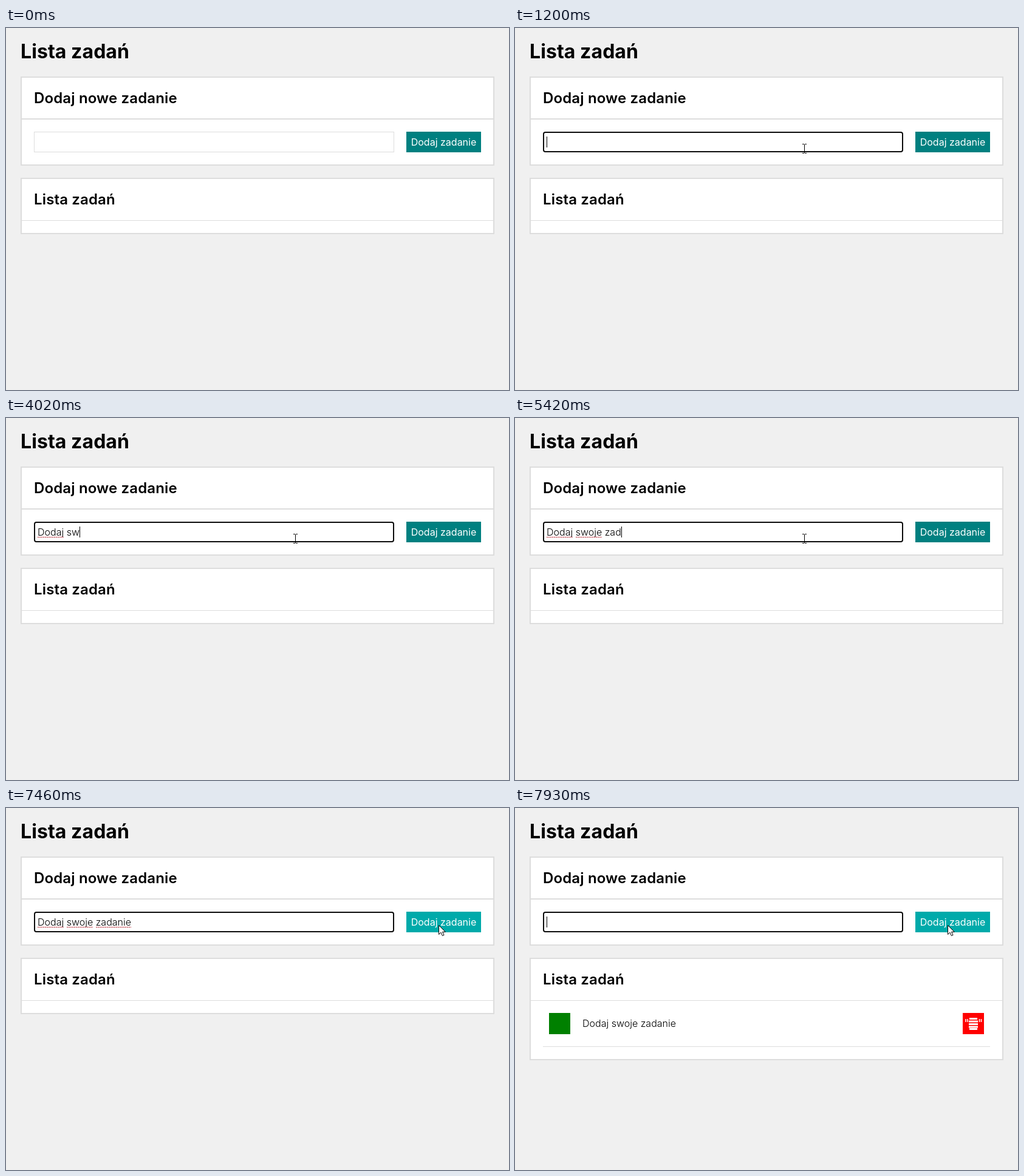
Write an HTML page that moves like this. It is 828 by 597 pixels and loops after 8 s.

```html
<!DOCTYPE html>
<html lang="pl">
<head>
<meta charset="utf-8">
<title>Lista zadań</title>
<style>
html, body { margin: 0; width: 100%; height: 100%; overflow: hidden; background: #f0f0f0; }
body { position: relative; color: #000; font: 400 16px/20px Inter, sans-serif; font-optical-sizing: none; }
body * { position: absolute; box-sizing: border-box; margin: 0; white-space: pre; }
h1 { left: 24px; top: 19px; font: 700 32px/39px Inter, sans-serif; letter-spacing: .002em; }
h2 { left: 20px; top: 19px; font: 600 24px/29px Inter, sans-serif; letter-spacing: .006em; }
.card { left: 24px; width: 780px; background: #fff; border: 2px solid #ddd; }
.rule { left: 0; width: 776px; background: #ddd; }
#add { top: 80px; height: 147px; }
#list { top: 247px; height: 93px; }
#list.filled { height: 169px; }
#field { left: 46px; top: 171px; width: 593px; height: 34px; background: #fff; border: 1px solid #ddd; }
#field.focus { border: 2px solid #0c0c0c; border-radius: 4px; }
#typed { left: 52px; top: 178px; font-weight: 300; }
#typed span, #caret { position: relative; }
#typed span.marked::after {
  content: ""; position: absolute; left: 0; right: 0; top: 18px; height: 1px;
  background: repeating-linear-gradient(90deg, #b3202c 0 2px, #f0d0d2 2px 3px);
}
#caret::after { content: ""; position: absolute; left: 0; top: 1px; width: 1px; height: 18px; background: #000; }
#button {
  left: 659px; top: 171px; width: 123px; height: 34px;
  line-height: 34px; text-align: center; color: #fff; background: #008080;
}
#button.hover { background: #00aaaa; }
#item { left: 20px; top: 89px; width: 736px; height: 56px; border-bottom: 1px solid #ddd; font-weight: 300; }
#item b { top: 0; width: 35px; height: 35px; }
#done { left: 10px; background: #008000; }
#remove { left: 691px; background: #f00; }
#item p { left: 65px; top: 7px; }
svg { left: 0; top: 0; overflow: visible; }
</style>
</head>
<body>
<h1>Lista zadań</h1>
<div class="card" id="add">
  <h2>Dodaj nowe zadanie</h2>
  <div class="rule" style="top:67px;height:2px"></div>
</div>
<div id="field"></div>
<div id="typed"><span></span><span></span><span></span><span></span><span></span><i id="caret"></i></div>
<div id="button">Dodaj zadanie</div>
<div class="card" id="list">
  <h2>Lista zadań</h2>
  <div class="rule" style="top:68px;height:1px"></div>
  <div id="item">
    <b id="done"></b>
    <p>Dodaj swoje zadanie</p>
    <b id="remove"><svg width="35" height="35" fill="none" stroke="#fff">
      <path d="M11 9.5h13M10 14h15M10 18.5h15M10 23h15M11 26.5h13" stroke-width="3"/>
      <path d="M5 10v5M8 10v5M27.5 10v5M30.5 10v5" stroke-width="1.5"/>
    </svg></b>
  </div>
</div>
<svg id="cursor" width="1" height="1">
  <path id="arrow" d="M.5 .5V15.5L4 12.2 6.4 17.7 9 16.6 6.6 11.3H11.3Z" fill="#fff" stroke="#000"/>
  <path id="beam" d="M-3 -7.5H0M1 -7.5H4M-3 7.5H0M1 7.5H4M.5 -7V7" fill="none" stroke="#000"/>
</svg>
<script>
const LOOP = 8000, STEP = 1000 / 15, BLINK = 525;
const ENTER = 330, FOCUS = 990, TYPE = 2330, TYPED = 5880;
const LEAVE = 6540, LAST_MARK = 6940, PRESS = 7810, ADDED = 7930;
const TEXT = "Dodaj swoje zadanie";

// typing rhythm: time, characters typed; linear in between
const RHYTHM = [[TYPE, 1], [2870, 4], [3370, 5], [4550, 12], [5480, 16], [TYPED, TEXT.length]];

// pointer paths: start, bend, end of a quadratic curve
const ARRIVE = { at: ENTER, steps: 8, power: 1, points: [[812, 299], [500, 240], [476, 199]] };
const DEPART = { at: LEAVE, steps: 10, power: 1.5, points: [[476, 199], [600, 218], [712, 193]] };

const $ = id => document.getElementById(id);
const show = (el, on) => { el.style.display = on ? "" : "none"; };
const inside = ([x, y], left, right, top, bottom) => x >= left && x < right && y >= top && y < bottom;
const spans = [...document.querySelectorAll("#typed span")];
const segments = TEXT.split(/( )/);

function typedCount(t) {
  if (t < TYPE || t >= ADDED) return 0;
  if (t >= TYPED) return TEXT.length;
  const i = RHYTHM.findIndex(key => key[0] > t);
  const [t0, n0] = RHYTHM[i - 1], [t1, n1] = RHYTHM[i];
  return Math.floor(n0 + (n1 - n0) * (t - t0) / (t1 - t0));
}

// the caret stays lit while typing and blinks after the last action
function caretOn(t) {
  if (t < FOCUS) return false;
  if (t >= ADDED || (t >= TYPE && t < TYPED)) return true;
  const idle = t - (t < TYPE ? FOCUS : TYPED);
  return idle % (2 * BLINK) < BLINK;
}

function pointerAt(t) {
  const { at, steps, power, points: [a, b, c] } = t < LEAVE ? ARRIVE : DEPART;
  const step = Math.floor((t - at + 7) / STEP);
  const p = Math.min(1, Math.max(0, step / steps));
  const u = 1 - (1 - p) ** power;
  return [0, 1].map(k =>
    Math.round((1 - u) ** 2 * a[k] + 2 * u * (1 - u) * b[k] + u * u * c[k]));
}

function drawText(t) {
  const count = typedCount(t);
  let start = 0;
  segments.forEach((segment, i) => {
    const end = start + segment.length;
    const shown = segment.slice(0, Math.max(0, count - start));
    if (spans[i].textContent !== shown) spans[i].textContent = shown;
    const checked = count > end || (count === TEXT.length && t >= LAST_MARK);
    spans[i].className = segment !== " " && checked ? "marked" : "";
    start = end;
  });
  show($("caret"), caretOn(t));
}

function drawPointer(t) {
  const spot = pointerAt(t);
  const overField = inside(spot, 46, 639, 171, 210);
  show($("cursor"), t >= ENTER);
  $("cursor").style.transform = `translate(${spot[0]}px, ${spot[1]}px)`;
  show($("beam"), overField);
  show($("arrow"), !overField);
  $("button").className = inside(spot, 659, 782, 171, 205) ? "hover" : "";
}

function draw() {
  const t = performance.now() % LOOP;
  const added = t >= ADDED;
  drawText(t);
  drawPointer(t);
  $("field").className = (t >= FOCUS && t < PRESS) || added ? "focus" : "";
  $("list").className = added ? "card filled" : "card";
  show($("item"), added);
  requestAnimationFrame(draw);
}
draw();
</script>
</body>
</html>
```
